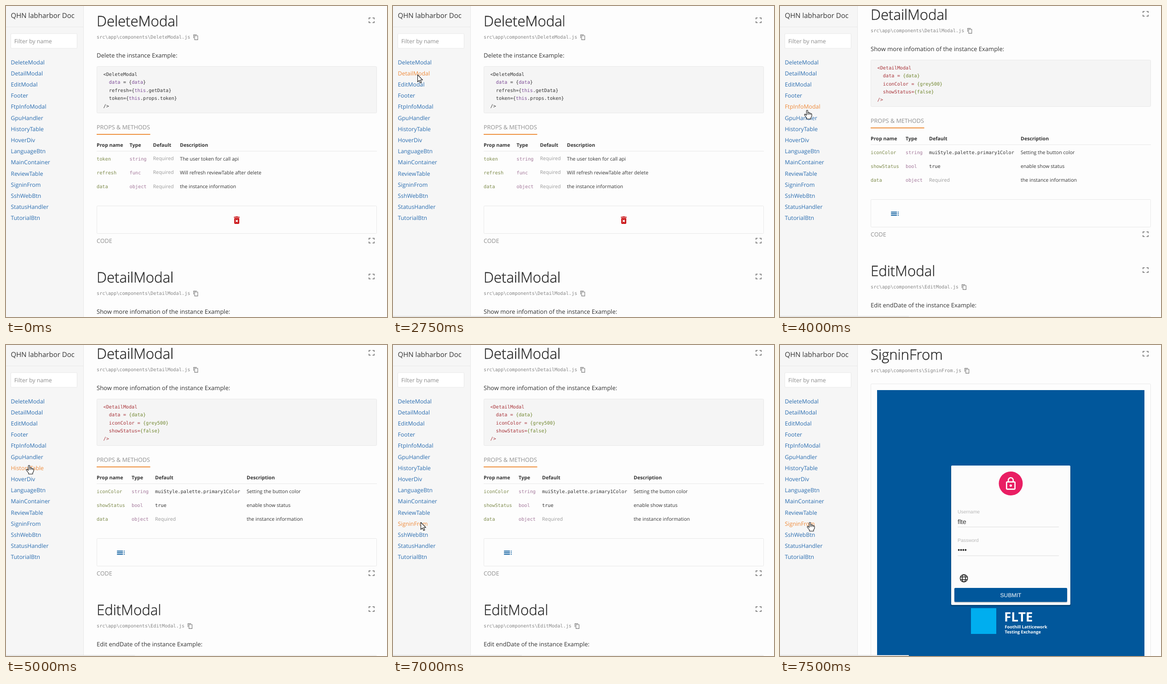
An HTML page that plays this animation: 828 by 676 pixels, repeating every 8000 ms.

```html
<!DOCTYPE html>
<html lang="en">
<head>
<meta charset="utf-8">
<title>Component docs</title>
<style>
html, body { margin: 0; width: 100%; height: 100%; overflow: hidden; background: #fdfdfd; }
svg { display: block; width: 828px; height: 676px; }
text { font: 13px "Open Sans", "Noto Sans", sans-serif; fill: #333; white-space: pre; text-rendering: geometricPrecision; }
.title { font-size: 15px; }
.link { font-size: 12.35px; fill: #2a6db0; }
.link.on { fill: #ee8a3a; }
.hint { font-size: 12.35px; fill: #8c8c8c; }
.h1 { font-size: 31.1px; font-weight: 300; fill: #2b2b2b; stroke: #2b2b2b; stroke-width: .5px; }
.mono { font: 10.24px "DejaVu Sans Mono", "Noto Sans Mono", monospace; }
.path { fill: #868686; }
.tab { font-size: 12.6px; fill: #8f8f8f; }
.th { font-size: 10.65px; font-weight: 700; }
.td { font-size: 10.65px; }
.pale { fill: #999; }
.name { fill: #7d8a4a; }
.type { fill: #a3779a; }
.form { font: 14px "Liberation Sans", Arial, sans-serif; }
.label { font-size: 10.45px; fill: #b8b8b8; }
.logo { font-size: 9.2px; font-weight: 700; fill: #fff; }
.frame { fill: none; stroke: #e8e8e8; }
.fill { fill: #f5f5f5; }
.rule { stroke: #e8e8e8; }
.icon { fill: none; stroke: #777; }
</style>
</head>
<body>
<svg id="stage" viewBox="0 0 828 676"></svg>
<script>
const BLUE = '#01579b', STEP = 250, LOOP = 8000;
const LINKS = ['DeleteModal', 'DetailModal', 'EditModal', 'Footer', 'FtpInfoModal', 'GpuHandler',
  'HistoryTable', 'HoverDiv', 'LanguageBtn', 'MainContainer', 'ReviewTable', 'SigninFrom',
  'SshWebBtn', 'StatusHandler', 'TutorialBtn'];

const esc = s => s.replace(/&/g, '&amp;').replace(/</g, '&lt;');
const text = (x, y, s, cls = '') => `<text x="${x}" y="${y}" class="${cls}">${esc(s)}</text>`;
const box = (x, y, w, h, attrs) => `<rect x="${x}" y="${y}" width="${w}" height="${h}" ${attrs}/>`;
const rule = (x1, y, x2, attrs = 'class="rule"') => `<path d="M${x1} ${y}H${x2}" ${attrs}/>`;
const glyph = (x, y, scale, color, d) =>
  `<path transform="translate(${x} ${y}) scale(${scale}) translate(-12 -12)" fill="${color}" d="${d}"/>`;

const expand = y => `<path class="icon" stroke-width="1.6" transform="translate(794.5 ${y})"
  d="M-5.6-2V-5.3H-2M2-5.3H5.6V-2M5.6 2V5.3H2M-2 5.3H-5.6V2"/>`;
const copy = (x, y) => `<path class="icon" stroke-width="1.1" transform="translate(${x} ${y})"
  d="M.6 8V.6H7.5M2.8 2.8H9.6V11.4H2.8Z"/>`;

// Text between ~ marks takes the second colour.
const code = (y, lines, colors) => lines.map((line, i) =>
  `<text class="mono" x="211.5" y="${y + i * 17.25}">` + line.split('~').map((part, k) =>
    `<tspan fill="${colors[k % 2]}">${esc(part)}</tspan>`).join('') + '</text>').join('');

const heading = (name, y) => {
  const path = `src\\app\\components\\${name}.js`;
  return text(197, y + 44, name, 'h1') + expand(y + 31) +
    text(197, y + 71, path, 'mono path') + copy(203.7 + path.length * 6.165, y + 62);
};

function section(y, doc) {
  const [c1, c2, c3, c4] = doc.cols;
  let out = heading(doc.name, y) + text(197, y + 112, doc.intro) +
    box(197.5, y + 131.5, 608, 101, 'rx="2" class="frame fill"');
  if (!doc.lines) return out;
  out += code(y + 152, doc.lines, doc.colors) +
    text(197, y + 267.5, 'PROPS & METHODS', 'tab') +
    rule(197, y + 279, 313.5, 'stroke="#ee9140" stroke-width="2"') +
    rule(197, y + 315.5, 806);
  ['Prop name', 'Type', 'Default', 'Description'].forEach((s, i) =>
    out += text(doc.cols[i], y + 305.5, s, 'th'));
  doc.rows.forEach(([name, type, value, about], i) => {
    const b = y + 335.5 + i * 30.2;
    out += text(c1, b, name, 'mono name') + text(c2, b, type, 'mono type') +
      (value ? text(c3, b, value, 'mono') : text(c3, b - .3, 'Required', 'td pale')) +
      text(c4, b + .3, about, 'td');
  });
  return out + box(197.5, y + 434.5, 608, 60, 'rx="2" class="frame"') +
    text(197, y + 515, 'CODE', 'tab') + expand(y + 510) + doc.icon(y + 465.5);
}

const deleteDoc = {
  name: 'DeleteModal', intro: 'Delete the instance Example:',
  lines: ['<DeleteModal', '  ~data~ = {~data~}', '  refresh={~this~.getData}', '  token={~this~.props.token}', '/>'],
  colors: ['#333', '#7c4b96'], cols: [197, 268.5, 319.5, 378],
  rows: [['token', 'string', '', 'The user token for call api'],
    ['refresh', 'func', '', 'Will refresh reviewTable after delete'],
    ['data', 'object', '', 'the instance information']],
  icon: y => glyph(501.5, y, .9, '#c8080c', 'M6 19c0 1.1.9 2 2 2h8c1.1 0 2-.9 2-2V7H6v12zm2.46-7.12l1.41-1.41L12 12.59l2.12-2.12 1.41 1.41L13.41 14l2.12 2.12-1.41 1.41L12 15.41l-2.12 2.12-1.41-1.41L10.59 14zM15.5 4l-1-1h-5l-1 1H5v2h14V4z')
};
const detailDoc = {
  name: 'DetailModal', intro: 'Show more infomation of the instance Example:',
  lines: ['<DetailModal', '  data = ~{data}~', '  iconColor = ~{grey500}~', '  showStatus=~{false}~', '/>'],
  colors: ['#a83238', '#71862f'], cols: [197, 273, 324, 523],
  rows: [['iconColor', 'string', 'muiStyle.palette.primary1Color', 'Setting the button color'],
    ['showStatus', 'bool', 'true', 'enable show status'],
    ['data', 'object', '', 'the instance information']],
  icon: y => glyph(249.5, y, .92, BLUE, 'M3 9h14V7H3zm0 4h14v-2H3zm0 4h14v-2H3zm16 0h2v-2h-2zm0-10v2h2V7zm0 6h2v-2h-2z')
};
const editDoc = { name: 'EditModal', intro: 'Edit endDate of the instance Example:', cols: [] };

const signin = () => heading('SigninFrom', -12) +
  box(197.5, 84.5, 608, 620, 'rx="2" class="frame"') +
  box(211, 98, 581, 600, `fill="${BLUE}"`) +
  box(371, 263, 261, 305, 'rx="3" opacity=".2"') +
  box(372, 262, 259, 303, 'rx="2" fill="#fcfcfc"') +
  '<circle cx="501.5" cy="301" r="26" fill="#e91e63"/>' +
  glyph(501.5, 301.6, 1.31, '#fff', 'M12 17c1.1 0 2-.9 2-2s-.9-2-2-2-2 .9-2 2 .9 2 2 2zm6-9h-1V6c0-2.76-2.24-5-5-5S7 3.24 7 6v2H6c-1.1 0-2 .9-2 2v10c0 1.1.9 2 2 2h12c1.1 0 2-.9 2-2V10c0-1.1-.9-2-2-2zM8.9 6c0-1.71 1.39-3.1 3.1-3.1s3.1 1.39 3.1 3.1v2H8.9V6zM18 20H6V10h12v10z') +
  text(386, 366, 'Username', 'form label') + text(386, 388.5, 'flte', 'form') + rule(386, 395.5, 606, 'stroke="#dedede"') +
  text(386, 428, 'Password', 'form label') + rule(386, 458, 606, 'stroke="#dedede"') +
  [0, 1, 2, 3].map(i => `<circle cx="${388.6 + i * 4.9}" cy="445.5" r="1.9" fill="#222"/>`).join('') +
  `<g transform="translate(399.6 507)" fill="none" stroke="#222" stroke-width="1.6">
    <circle r="8"/><ellipse rx="3.5" ry="8"/><path d="M-7.4-2.8H7.4M-7.4 2.8H7.4"/></g>` +
  box(378.5, 528.5, 246, 31.5, 'rx="2" opacity=".2"') +
  box(379, 528, 245, 30.5, `rx="2" fill="${BLUE}"`) +
  '<text class="form" x="501.5" y="547.5" text-anchor="middle" style="font-size:12.2px;fill:#fff">SUBMIT</text>' +
  box(415, 572, 55, 56, 'fill="#00aeef"') +
  '<text class="logo" x="487" y="601" style="font-size:28px">FLTE</text>' +
  text(488.5, 616, 'Foothill Latticework', 'logo') + text(488.5, 627, 'Testing Exchange', 'logo');

const sidebar = box(0, 0, 168, 676, 'fill="#f6f6f6"') +
  '<path class="rule" d="M168.5 0V676M0 45.5H168"/>' +
  text(10.5, 26.3, 'QHN labharbor Doc', 'title') +
  box(10.5, 60, 144, 32, 'rx="2" fill="#fff" stroke="#e8e8e8"') +
  text(18, 81, 'Filter by name', 'hint') +
  LINKS.map((s, i) => text(10.5, 126.7 + i * 24.18, s, 'link')).join('');

const pages = [
  section(0, deleteDoc) + section(557, detailDoc),
  section(-14, detailDoc) + section(543, editDoc),
  signin()
];

const stage = document.getElementById('stage');
stage.innerHTML = pages.map(p => `<g class="page">${p}</g>`).join('') + sidebar +
  `<g id="status"><rect y="674" width="280" height="2" fill="#f4f4f4"/><path d="M0 674.5H280" stroke="#d6d6d6"/></g>
  <path id="pointer" fill="#fff" stroke="#111" stroke-width="1.1" stroke-linejoin="round"/>`;

const SHAPES = {
  arrow: 'M0 0V15.5L3.6 12.2 6 17.8 8.5 16.7 6.1 11.3H11Z',
  hand: 'M-2 1.5Q-2 0-.5 0T1 1.5V6Q1 5 2.5 5T4 6.5Q4.2 5.7 5.5 6T7 7.5Q7.4 7 8.5 7.4T9.5 9V13L7.5 16.5V19H-1.5V16.5L-6 11Q-7 8.5-5 8.5L-2 11ZM1 6V10M4 6.5V10M7 7.5V10'
};
// Pointer tip: time, x, y
const TRACK = [[250, 312, 512], [500, 210, 300], [750, 115, 125], [1000, 70, 28],
  [1500, 55, 97], [1750, 60, 157], [2250, 46, 137], [2750, 53, 149], [3250, 53, 149],
  [4000, 59, 226], [4500, 56, 284], [5000, 50, 261], [5750, 60, 374],
  [6000, 64, 390], [6750, 62, 394], [7000, 60, 385], [7250, 60, 385], [7500, 65, 385]];

function tip(t) {
  const next = TRACK.findIndex(k => k[0] > t);
  if (next < 0) return TRACK[TRACK.length - 1].slice(1);
  const [t0, x0, y0] = TRACK[next - 1], [t1, x1, y1] = TRACK[next];
  const p = (t - t0) / (t1 - t0);
  return [x0 + (x1 - x0) * p, y0 + (y1 - y0) * p];
}

const pageEls = stage.querySelectorAll('.page'), linkEls = stage.querySelectorAll('.link');
const pointer = document.getElementById('pointer'), status = document.getElementById('status');
const show = (el, on) => el.setAttribute('display', on ? 'inline' : 'none');

function draw(now) {
  const t = Math.floor(now % LOOP / STEP) * STEP;
  const page = t < 3000 ? 0 : t < 7250 ? 1 : 2;
  pageEls.forEach((el, i) => show(el, i === page));
  show(status, t >= 1750);

  const visible = t >= 250 && t !== 1250;
  show(pointer, visible);
  let row = -1;
  if (visible) {
    const [x, y] = tip(t);
    if (x < 100) row = Math.floor((y - 110) / 24.18);
    const busy = t === 2750 || t === 7000 || t === 7250;
    pointer.setAttribute('d', row < 0 || busy ? SHAPES.arrow : SHAPES.hand);
    pointer.setAttribute('transform', `translate(${Math.round(x) + .5} ${Math.round(y) + .5})`);
  }
  linkEls.forEach((el, i) => el.classList.toggle('on', i === row));
}

const start = performance.now();
function tick() {
  draw(performance.now() - start);
  requestAnimationFrame(tick);
}
tick();
</script>
</body>
</html>
```
